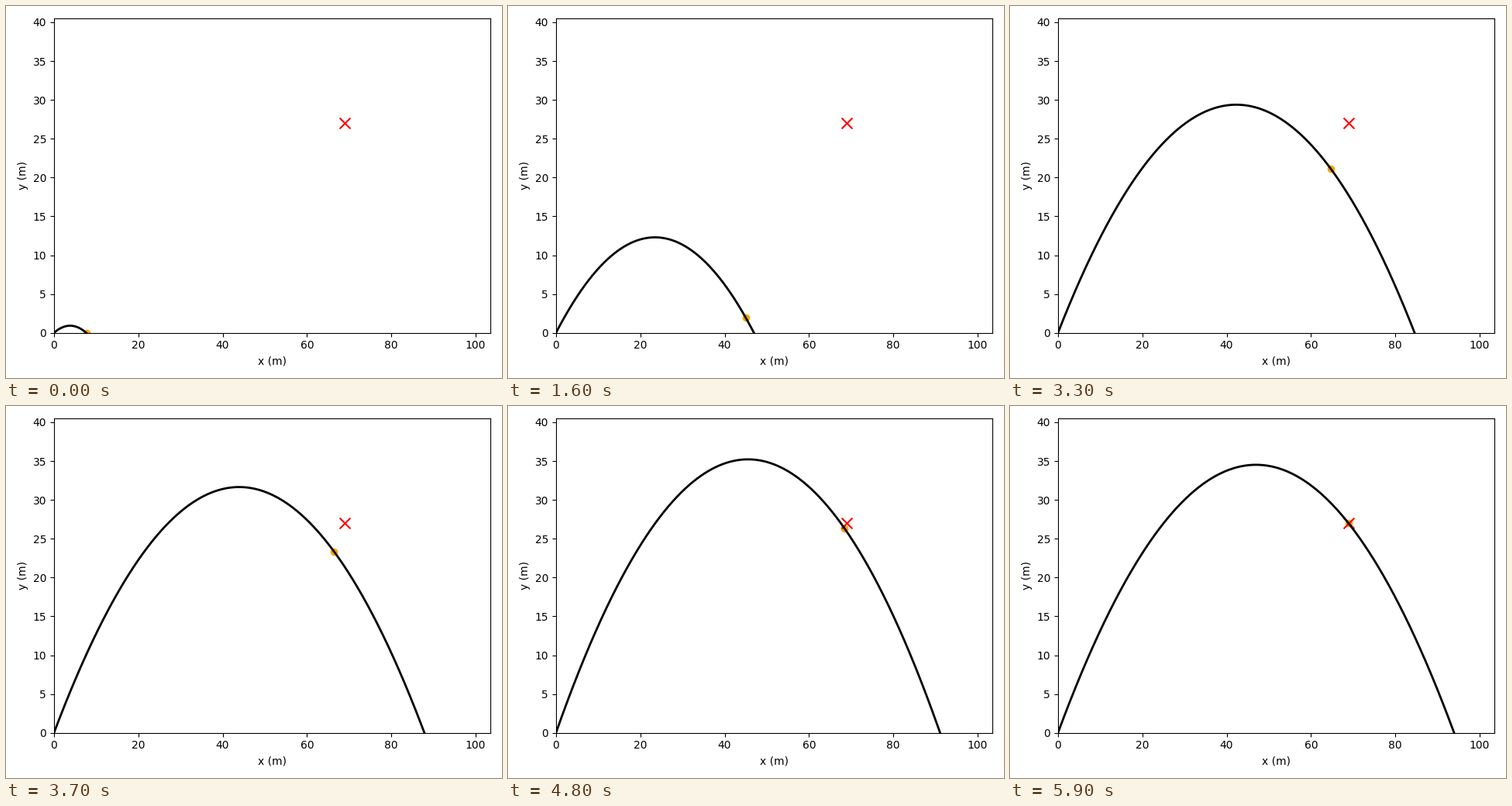
These frames come from a looping animation (640 by 480 pixels, 6000 ms). A matplotlib script:

```python
import numpy as np
import matplotlib.pyplot as plt
from matplotlib.animation import FuncAnimation

FRAMES = 60
INTERVAL = 100
TARGET = np.array([69.0, 27.0])

# Key moments of the search: step, range of the shot, peak height (m)
STEPS, RANGES, PEAKS = np.transpose([
    (0, 7.65, 0.92), (7, 17.7, 2.35), (16, 46.95, 12.3),
    (24, 69.3, 21.47), (33, 84.58, 29.38), (42, 90.25, 33.75),
    (48, 91.1, 35.22), (52, 96.0, 33.4), (59, 93.95, 34.52),
])


def glide(t, ts, vs):
    """Cubic easing through the key values, level at each turning point."""
    h = np.diff(ts)
    d = np.diff(vs) / h
    a, b = d[:-1], d[1:]
    bend = np.where(a * b > 0, 2 * a * b / (a + b), 0)
    m = np.concatenate([d[:1], bend, [0]])
    i = min(np.searchsorted(ts, t, side="right") - 1, len(h) - 1)
    u = (t - ts[i]) / h[i]
    ease = u * u * (3 - 2 * u)
    drift = h[i] * u * (1 - u) * (m[i] * (1 - u) - m[i + 1] * u)
    return vs[i] + (vs[i + 1] - vs[i]) * ease + drift


def trajectory(step):
    reach = glide(step, STEPS, RANGES)
    peak = glide(step, STEPS, PEAKS)
    u = np.linspace(0, 1, 1000)
    return reach * u, 4 * peak * u * (1 - u)


fig, ax = plt.subplots(figsize=(6.4, 4.8), dpi=100)
ax.set_xlim(0, 1.5 * TARGET[0])
ax.set_ylim(0, 1.5 * TARGET[1])
ax.set_xlabel("x (m)")
ax.set_ylabel("y (m)")
closest = ax.scatter([], [], color="orange")
ax.scatter(*TARGET, s=100, marker="x", color="red")
path, = ax.plot([], [], color="black", lw=2)
fig.tight_layout()


def update(step):
    x, y = trajectory(step)
    path.set_data(x, y)
    i = np.argmin(np.hypot(x - TARGET[0], y - TARGET[1]))
    closest.set_offsets([[x[i], y[i]]])
    return path, closest


anim = FuncAnimation(fig, update, frames=FRAMES, interval=INTERVAL,
                     repeat=True, repeat_delay=0)
plt.show()
```
